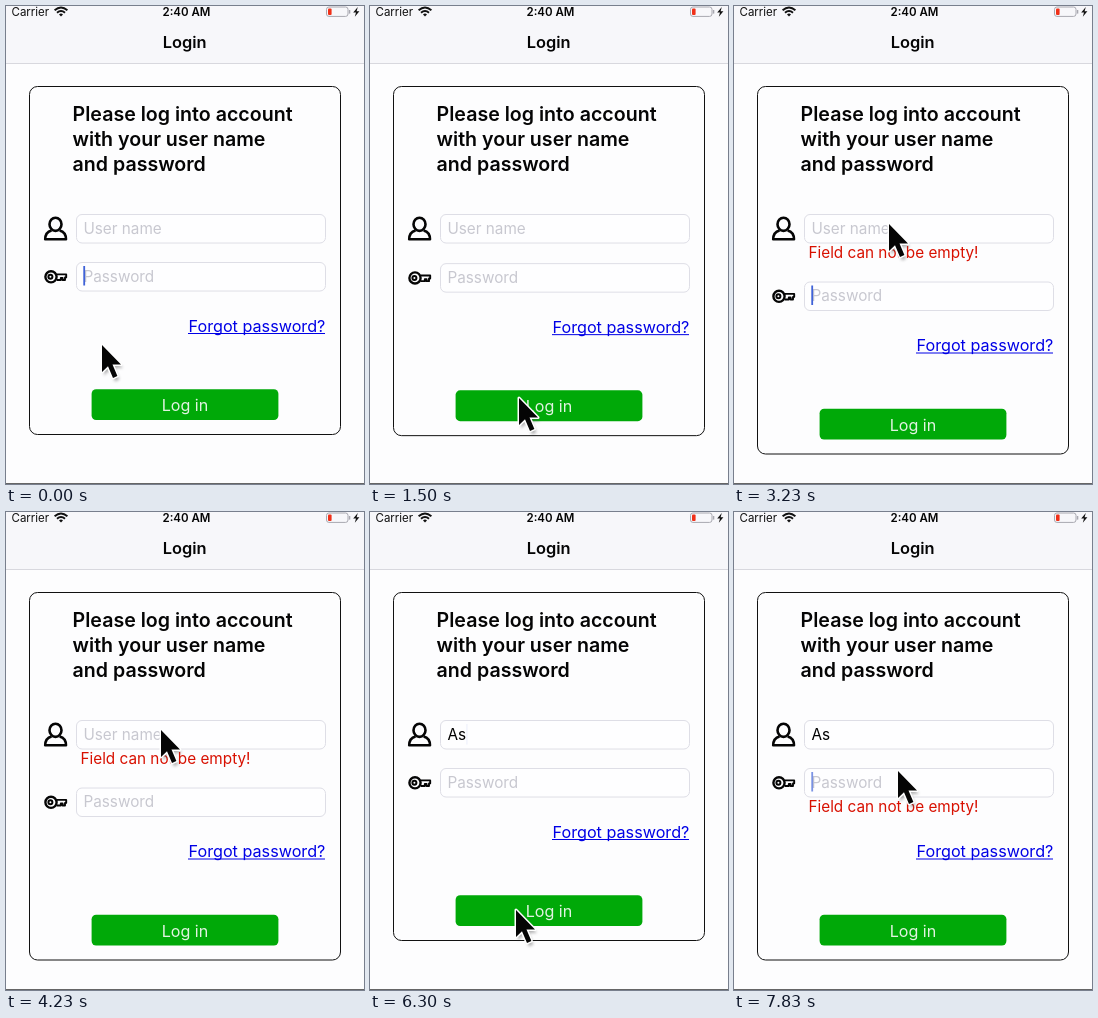
An HTML page that plays this animation: 358 px wide and 478 px high, repeating every 8 s.

```html
<!DOCTYPE html>
<html lang="en">
<head>
<meta charset="utf-8">
<title>Login</title>
<style>
  html, body { margin: 0; width: 100%; height: 100%; overflow: hidden; background: #fdfdfe; }
  svg { display: block; width: 358px; height: 478px; font: 15.3px Inter, "Open Sans", sans-serif; }
  .status { font-size: 11.5px; fill: #111; }
  .bold { font-weight: 600; fill: #050505; }
  .mid { text-anchor: middle; }
  .hint { fill: #c8c8d0; }
  .error { fill: #d81000; }
  .link { font-size: 16.2px; fill: #0000e6; }
  .field { fill: #fefeff; stroke: #dedee6; }
  .caret { fill: #3f62d8; }
  .icon { fill: none; stroke: #050505; stroke-linejoin: round; }
</style>
</head>
<body>
<svg viewBox="0 0 358 478">
  <rect width="358" height="478" fill="#fdfdfe"/>
  <rect width="358" height="57" fill="#f7f7fa"/>
  <path d="M0 57.5H358" stroke="#d8d8de"/>
  <path d="M0 477.5H358" stroke="#666"/>

  <text class="status" x="5.5" y="10">Carrier</text>
  <g fill="none" stroke="#111" stroke-width="1.9">
    <path d="M48.6 4.2Q55 -1.4 61.4 4.2M51 6.8Q55 3.3 59 6.8"/>
    <path d="M53 8.4Q55 6.8 57 8.4L55 10.6Z" fill="#111" stroke="none"/>
  </g>
  <text class="status bold mid" x="180.5" y="10">2:40 AM</text>
  <rect x="320.5" y="1" width="21.5" height="9.4" rx="2.4" fill="none" stroke="#a8a8b0"/>
  <path d="M343.6 4V7.6" stroke="#a8a8b0" stroke-width="1.4"/>
  <rect x="322" y="2.5" width="3.6" height="6.4" rx="1" fill="#f03018"/>
  <path d="M351.8 1L347.2 6.4H350L348.8 10.8L353.4 5.2H350.6Z" fill="#111"/>
  <text class="bold mid" x="178.6" y="42" font-size="16.4">Login</text>

  <rect id="card" x="23.5" y="80.5" width="311" height="348" rx="8" fill="none" stroke="#111"/>
  <g class="bold" font-size="19.6">
    <text x="66.6" y="115">Please log into account</text>
    <text x="66.6" y="140.3">with your user name</text>
    <text x="66.6" y="165.4">and password</text>
  </g>

  <g class="icon" stroke-width="2.6">
    <ellipse cx="49.5" cy="218.3" rx="6" ry="6.6"/>
    <path d="M45.6 224.4Q39.2 226 39.2 233.3H60Q60 226 53.6 224.4"/>
  </g>
  <rect class="field" x="70.5" y="208.5" width="249" height="28.5" rx="5.5"/>
  <text id="user" x="77.4" y="228"></text>
  <rect id="userCaret" class="caret" y="212" width="1.8" height="20.5"/>
  <text id="userError" class="error" x="74.5" y="252.4">Field can not be empty!</text>

  <g id="passRow">
    <g class="icon">
      <path d="M50.6 268.4H60.2V271.4H59V274H56.6V272H54.8V274H50.6" stroke-width="1.9"/>
      <circle cx="45" cy="270.8" r="5.6" stroke-width="2.4"/>
      <circle cx="44.4" cy="270.8" r="2" stroke-width="2"/>
    </g>
    <rect class="field" x="70.5" y="256.5" width="249" height="28.5" rx="5.5"/>
    <text class="hint" x="77.4" y="275.8">Password</text>
    <rect id="passCaret" class="caret" x="77.3" y="260" width="1.8" height="19.5"/>
    <text id="passError" class="error" x="74.5" y="300.4">Field can not be empty!</text>
  </g>

  <g id="footer">
    <text class="link" x="319.4" y="325.5" text-anchor="end">Forgot password?</text>
    <path d="M182 327.5H319" stroke="#0000e6"/>
    <rect x="85.6" y="383.2" width="186.8" height="30.8" rx="4.5" fill="#00a908"/>
    <text class="mid" x="179" y="405" font-size="16.1" fill="#e2f3e2">Log in</text>
  </g>

  <defs>
    <filter id="blur" x="-40%" y="-40%" width="180%" height="180%"><feGaussianBlur stdDeviation="1.6"/></filter>
    <path id="arrow" d="M0 0V27L6 21.3L11 33L15.4 31L10.5 19.6H19Z"/>
  </defs>
  <g id="cursor">
    <use href="#arrow" x="2" y="3.5" fill="#555" opacity=".45" filter="url(#blur)"/>
    <use href="#arrow" fill="#050505" stroke="#fff" stroke-width="3" paint-order="stroke" stroke-linejoin="round"/>
  </g>
</svg>
<script>
const LOOP = 8000, ROW = 19.5, TEXT_X = 77.3;
const USER_FOCUS = 4190, TYPING = 4380, KEY_GAP = 220, PASS_FOCUS = 7790;
const $ = id => document.getElementById(id);

// Pointer moves: start, end, then where it goes.
const home = { x: 96, y: 339 };
const moves = [
  { from: 0, to: 830, x: 149, y: 392 },
  { from: 1540, to: 2110, x: 155, y: 218 },
  { from: 4870, to: 5320, x: 130, y: 277 },
  { from: 5320, to: 6300, x: 146, y: 398 },
  { from: 6850, to: 7530, x: 164, y: 259 }
];

const clamp = v => Math.max(0, Math.min(1, v));
const smooth = u => u * u * (3 - 2 * u);

function pointer(t) {
  let { x, y } = home;
  for (const m of moves) {
    const k = smooth(clamp((t - m.from) / (m.to - m.from)));
    x += (m.x - x) * k;
    y += (m.y - y) * k;
  }
  return [x, y];
}

function spring(t) {
  if (t <= 0) return 0;
  const w = 0.0185, a = 0.0112;
  return 1 - Math.exp(-a * t) * (Math.cos(w * t) + a / w * Math.sin(w * t));
}

// One second cycle with soft edges, fully lit around the given phase.
const blink = (t, phase) => clamp(0.65 + 0.75 * Math.cos(2 * Math.PI * (t - phase) / 1000));

const shift = (id, x, y) => $(id).setAttribute("transform", `translate(${x} ${y})`);
const fade = (id, v) => $(id).setAttribute("opacity", clamp(v));

function draw(t) {
  const userOpen = spring(t - 1484) - spring(t - TYPING);
  const passOpen = spring(t - 6420);
  const drop = ROW * (userOpen + passOpen);
  shift("passRow", 0, ROW * userOpen);
  shift("footer", 0, drop);
  $("card").setAttribute("height", 348 + drop);
  fade("userError", userOpen * 1.4 - 0.4);
  fade("passError", passOpen * 1.4 - 0.4);

  const typed = "As".slice(0, Math.max(0, Math.floor((t - TYPING) / KEY_GAP) + 1));
  const user = $("user");
  user.textContent = typed || "User name";
  user.setAttribute("class", typed ? "" : "hint");
  $("userCaret").setAttribute("x", TEXT_X + (typed ? user.getComputedTextLength() : 0));

  const inUser = t >= USER_FOCUS && t < PASS_FOCUS;
  fade("userCaret", inUser && t > USER_FOCUS + 150 ? blink(t, -95) : 0);
  fade("passCaret", inUser ? 0 : blink(t, 75));
  shift("cursor", ...pointer(t));
}

const start = performance.now();
function tick() {
  draw((performance.now() - start) % LOOP);
  requestAnimationFrame(tick);
}
tick();
</script>
</body>
</html>
```
